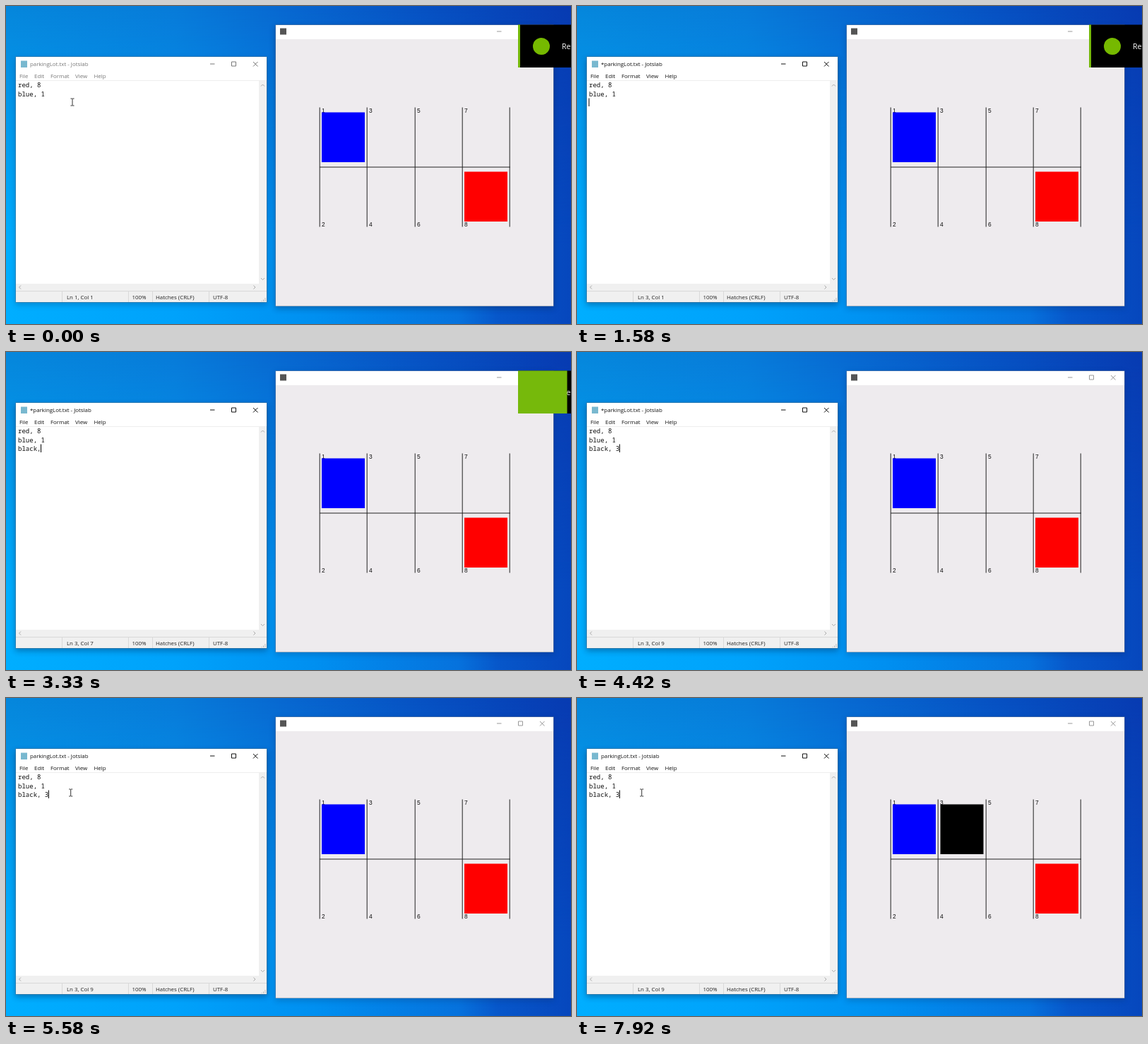
Animation, 800 px wide and 450 px high, one loop 8 s. Source, as an HTML page:

```html
<!DOCTYPE html>
<html lang="en">
<head>
<meta charset="utf-8">
<title>Parking lot</title>
<style>
  html, body { margin: 0; width: 100%; height: 100%; overflow: hidden; background: #0a78d8; }
  svg { display: block; width: 100%; height: 100%; }
  text { white-space: pre; }
  .ui { font: 7.9px "Open Sans", "Noto Sans", sans-serif; }
  .mono { font: 9.03px "Noto Sans Mono", "DejaVu Sans Mono", monospace; fill: #111; }
  .slot { font: 8.4px "Liberation Sans", Arial, sans-serif; fill: #111; }
  .line { fill: none; stroke-width: 1; }
</style>
</head>
<body>
<svg viewBox="0 0 800 450" preserveAspectRatio="none">
  <defs>
    <linearGradient id="sky">
      <stop offset="0" stop-color="#0687dc"/>
      <stop offset=".3" stop-color="#087bd9"/>
      <stop offset=".5" stop-color="#0867d0"/>
      <stop offset=".75" stop-color="#0750c2"/>
      <stop offset="1" stop-color="#083bb2"/>
    </linearGradient>
    <linearGradient id="floor">
      <stop offset="0" stop-color="#00aeff"/>
      <stop offset=".3" stop-color="#00a2fb"/>
      <stop offset=".55" stop-color="#008ff0"/>
      <stop offset=".8" stop-color="#0672dd"/>
      <stop offset=".87" stop-color="#0757ca"/>
      <stop offset="1" stop-color="#0647bd"/>
    </linearGradient>
    <linearGradient id="fade" x2="0" y2="1">
      <stop offset="0" stop-color="#000"/>
      <stop offset=".75" stop-color="#fff"/>
    </linearGradient>
    <mask id="low"><rect width="800" height="450" fill="url(#fade)"/></mask>
    <filter id="soft" x="-10%" y="-10%" width="120%" height="120%"><feGaussianBlur stdDeviation="4"/></filter>
  </defs>

  <rect width="800" height="450" fill="url(#sky)"/>
  <rect width="800" height="450" fill="url(#floor)" mask="url(#low)"/>

  <g id="lot">
    <rect id="lotShade" x="381" y="29" width="395" height="399" fill="#002050" filter="url(#soft)"/>
    <rect x="381.5" y="26.5" width="394" height="398.5" fill="#64789a"/>
    <rect x="382" y="27" width="393" height="397.5" fill="#eeebee"/>
    <rect x="382" y="27" width="393" height="20" fill="#fff"/>
    <rect x="388" y="31.5" width="9" height="9" fill="#555"/>
    <g class="line" id="lotButtons" stroke="#999"></g>
    <g id="slots"></g>
    <rect x="447" y="150.5" width="61" height="70.5" fill="#00f"/>
    <rect x="649" y="234.5" width="61" height="70.5" fill="#f00"/>
    <rect id="newCar" x="514.5" y="150.5" width="61" height="70.5" fill="#000"/>
  </g>

  <g id="editor">
    <rect id="editShade" x="13" y="75" width="357" height="348" fill="#002050" filter="url(#soft)"/>
    <rect x="13.5" y="71.5" width="356" height="348" fill="#4d7390"/>
    <rect x="14" y="72" width="355" height="347" fill="#fff"/>
    <rect x="21" y="77.5" width="9" height="9.5" fill="#79b8cf"/>
    <g id="chrome" class="ui">
      <text id="title" x="34" y="85"></text>
      <text x="19" y="102">File</text>
      <text x="40" y="102">Edit</text>
      <text x="63" y="102">Format</text>
      <text x="98" y="102">View</text>
      <text x="124.5" y="102">Help</text>
    </g>
    <g class="line" id="editButtons"></g>
    <path d="M14 105.5H369" stroke="#eee"/>
    <path d="M358 106H369V419H14V393H358Z" fill="#f0f0f0"/>
    <path class="line" stroke="#aaa" d="M361 113.5l2.5-2.5 2.5 2.5M361 385l2.5 2.5 2.5-2.5M21 395.5l-2.5 2.5 2.5 2.5M350.500 395.5l2.500 2.500-2.500 2.500"/>
    <path class="line" stroke="#d9d9d9" d="M14 403.500H369M79.500 404V419M173.500 404V419M207.500 404V419M287.500 404V419"/>
    <path d="M367 413v5M364.500 415.500v2.500M362 417v1" stroke="#bbb"/>
    <g class="ui" fill="#222">
      <text id="position" x="86" y="415"></text>
      <text x="178.500" y="415">100%</text>
      <text x="212" y="415">Hatches (CRLF)</text>
      <text x="293" y="415">UTF-8</text>
    </g>
    <g class="mono">
      <text x="17" y="115.3">red, 8</text>
      <text x="17" y="127.500">blue, 1</text>
      <text id="typed" x="17" y="139.500"></text>
    </g>
    <rect id="caret" width="1" height="11.500" fill="#000"/>
    <path id="pointer" class="line" stroke="#333" d="M-2.500-5H-.7L0-4.500.7-5H2.500M0-4.500V4.500M-2.500 5H-.7L0 4.500.7 5H2.500"/>
  </g>

  <g id="toast">
    <rect x="725" y="26.500" width="75" height="60.500" fill="#000"/>
    <circle cx="758" cy="57" r="12" fill="#76b900"/>
    <text x="787" y="61" fill="#fff" style="font:10.500px 'Open Sans','Noto Sans',sans-serif">Recording</text>
    <rect id="band" x="725" y="26.500" height="60.500" fill="#76b90b"/>
  </g>
</svg>
<script>
const LOOP = 8000, CHAR = 5.42;
const FOCUS = 420, ENTER = 1170, SAVE = 4920, PARKED = 5960;
const WORD = "black, 3";
const KEYS = [1830, 2080, 2250, 2500, 2670, 3080, 4080, 4380];

const el = id => document.getElementById(id);
const set = (id, attrs) => {
  for (const name in attrs) el(id).setAttribute(name, attrs[name]);
};
const show = (id, on) => set(id, { visibility: on ? "visible" : "hidden" });
const ramp = (t, from, to) => Math.max(0, Math.min(1, (t - from) / (to - from)));

function buttons(id, x, y) {
  el(id).innerHTML = `<path d="M${x} ${y}h6.500M${x + 30.500} ${y - 3}h6v6h-6zM${x + 61} ${y - 3}l6.500 6.500m0-6.500l-6.500 6.500"/>`;
}

function drawSlots() {
  let path = "M444 228H714", labels = "";
  for (let i = 0; i < 5; i++) {
    const x = 444 + Math.round(i * 67.3);
    path += `M${x + .2} 143.500V312.500`;
    if (i < 4) labels += `<text x="${x + 3}" y="150.500">${2 * i + 1}</text><text x="${x + 3}" y="312">${2 * i + 2}</text>`;
  }
  el("slots").innerHTML = `<path class="line" stroke="#222" d="${path}"/><g class="slot">${labels}</g>`;
}

function draw(t) {
  const focused = t >= FOCUS;
  const count = KEYS.filter(k => k <= t).length;
  const dirty = t >= ENTER && t < SAVE;
  el("title").textContent = (dirty ? "*" : "") + "parkingLot.txt - Jotslab";
  set("chrome", { fill: focused ? "#111" : "#777" });
  set("editButtons", { stroke: focused ? "#111" : "#777" });
  set("editShade", { opacity: focused ? .4 : .25 });
  set("lotShade", { opacity: focused ? .25 : .4 });

  const [row, col] = t < FOCUS ? [1, 1] : t < ENTER ? [2, 8] : [3, count + 1];
  el("position").textContent = `Ln ${row}, Col ${col}`;
  el("typed").textContent = WORD.slice(0, count);

  // The blink restarts at every key press.
  const last = [FOCUS, ENTER, ...KEYS].filter(k => k <= t).pop();
  show("caret", focused && (t - last) % 1060 < 530);
  set("caret", { x: 16.500 + (col - 1) * CHAR, y: 106.500 + (row - 1) * 12 });

  const back = t >= 5160;
  show("pointer", t < ENTER || back);
  set("pointer", { transform: back ? "translate(91.700 134)" : "translate(94 136)" });
  show("newCar", t >= PARKED);

  const grow = ramp(t, 3160, 3345), out = ramp(t, 3400, 3700);
  set("band", { width: 3 + 72 * grow });
  set("toast", { transform: `translate(${76 * out * out} 0)` });
  show("toast", out < 1);
}

buttons("lotButtons", 695, 36);
buttons("editButtons", 289, 82);
drawSlots();

const start = performance.now();
function tick() {
  draw((performance.now() - start) % LOOP);
  requestAnimationFrame(tick);
}
tick();
</script>
</body>
</html>
```
